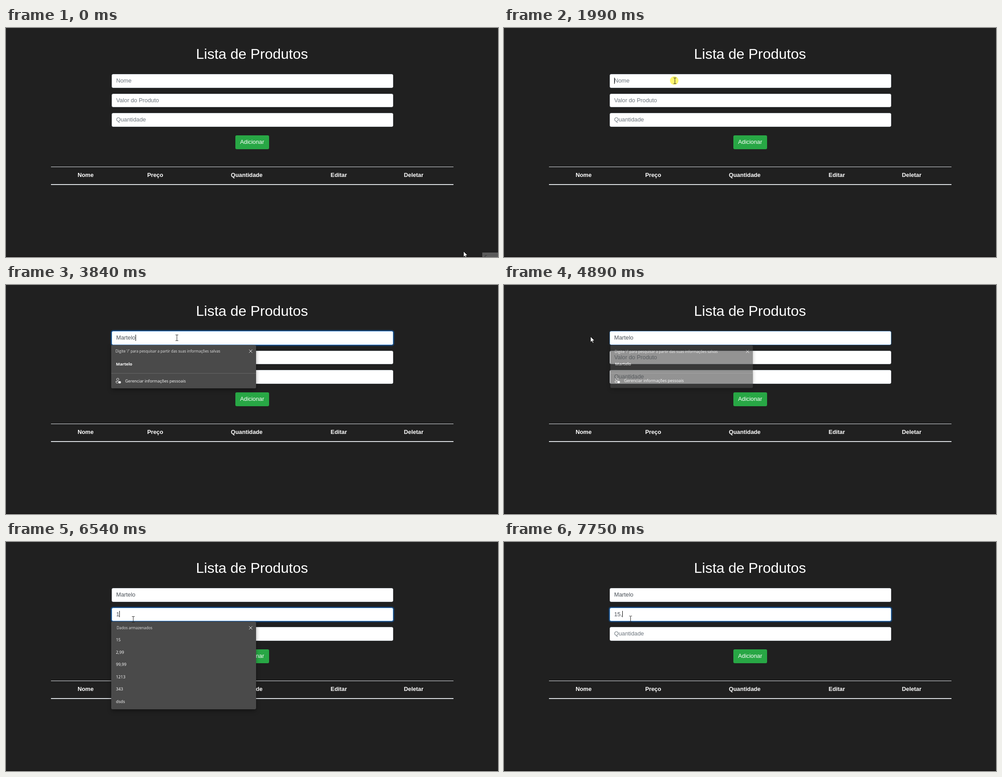
These frames come from a looping animation (1094x512 px, 8 s). An HTML page:

```html
<!DOCTYPE html>
<html lang="pt-BR">
<head>
<meta charset="utf-8">
<title>Lista de Produtos</title>
<style>
html, body { margin: 0; width: 100%; height: 100%; overflow: hidden; background: #202020; }
#stage {
  position: relative; width: 1094px; height: 512px; overflow: hidden; background: #202020;
  font: 12.8px/20px "Liberation Sans", Arial, sans-serif; color: #fff; white-space: pre; cursor: default;
}
#stage div, #stage svg { position: absolute; box-sizing: border-box; }
#stage .title { left: 0; width: 1094px; top: 38px; font-size: 32px; line-height: 40px; text-align: center; }
#stage .field {
  left: 234.6px; width: 626px; height: 30.4px; padding-left: 9.4px; line-height: 28.6px;
  background: #fff; border: 1px solid #ced4da; border-radius: 3.2px; color: #495057;
}
.hint { color: #6c757d; }
.caret { display: inline-block; width: 1px; height: 14px; margin-right: -1px; background: #000; vertical-align: -2.5px; }
#stage .button {
  left: 510px; top: 240px; width: 74.5px; height: 30.6px; line-height: 30.4px;
  border-radius: 3.2px; background: #28a745; text-align: center;
}
#stage .rule { left: 100px; width: 895px; background: #dee2e6; }
#stage .head { top: 319px; width: 120px; margin-left: -60px; font-weight: bold; text-align: center; }
#stage .edge { left: 0; top: 510px; width: 1094px; height: 2px; background: #191717; }
#stage .status {
  left: 1059px; top: 502px; width: 35px; height: 10px; overflow: hidden;
  background: #5a5a5a; color: #222; font: 9px/20px "Open Sans", sans-serif; padding-left: 5px;
}
#stage .popup {
  left: 234px; width: 322px; background: #4a4a4a; border-radius: 3px; overflow: hidden;
  box-shadow: 0 4px 10px rgba(0, 0, 0, .36); font: 9.2px/20px "Open Sans", "Noto Sans", sans-serif;
}
#stage .caption { font-size: 8.3px; color: #e4e4e4; }
#stage .row { left: 10.5px; }
#stage .foot { left: 0; bottom: 0; width: 322px; height: 34px; background: #4a4a4a; border-top: 1px solid #666; padding-left: 31px; line-height: 34px; font-size: 9.05px; }
#stage .track { left: 309px; top: 25px; width: 12px; height: 215px; background: #2c2c2c; }
#stage .thumb { left: 2px; top: 16px; width: 8px; height: 124px; border-radius: 4px; background: #686868; }
svg { overflow: visible; fill: none; stroke: #eee; }
#stage .halo { width: 19px; height: 19px; margin: -10.5px 0 0 -11px; border-radius: 50%; background: rgba(255, 240, 20, .62); }
</style>
</head>
<body>
<div id="stage"></div>
<script>
const LOOP = 8000;
const stage = document.getElementById('stage');

function add(parent, cls, text = '', style = {}) {
  const el = document.createElement('div');
  el.className = cls;
  el.textContent = text;
  Object.assign(el.style, style);
  parent.append(el);
  return el;
}
function addSvg(parent, x, y, markup) {
  parent.insertAdjacentHTML('beforeend',
    `<svg width="1" height="1" style="left:${x}px;top:${y}px">${markup}</svg>`);
  return parent.lastElementChild;
}
const clamp = v => Math.max(0, Math.min(1, v));
const ramp = (t, from, to) => clamp((t - from) / (to - from));
const smooth = k => k * k * (3 - 2 * k);
const within = (t, [from, to]) => t >= from && t < to;
const show = (el, on) => { el.style.display = on ? '' : 'none'; };

// Page
add(stage, 'title', 'Lista de Produtos');

function makeField(top, hint, keys, focus) {
  const el = add(stage, 'field', '', { top: top + 'px' });
  el.innerHTML = '<span></span><span class="caret"></span><span class="hint"></span>';
  const [value, caret, placeholder] = el.children;
  return { el, top, hint, keys, focus, value, caret, placeholder };
}
const fields = [
  makeField(103.4, 'Nome',
    [[2500, 'M'], [2860, 'a'], [3260, 'r'], [3440, 't'], [3600, 'e'], [3650, 'l'], [3840, 'o']],
    { caret: [1960, 4760], ring: [1990, 4760] }),
  makeField(146.8, 'Valor do Produto',
    [[6540, '1'], [6875, '5'], [7750, ',']],
    { caret: [5550, LOOP], ring: [5560, LOOP] }),
  makeField(190.2, 'Quantidade', [], { caret: [LOOP, LOOP], ring: [LOOP, LOOP + 1] })
];
const button = add(stage, 'button', 'Adicionar');

add(stage, 'rule', '', { top: '310px', height: '1px' });
add(stage, 'rule', '', { top: '349px', height: '2px' });
[['Nome', 177], ['Preço', 331.7], ['Quantidade', 535.3], ['Editar', 740], ['Deletar', 906.5]]
  .forEach(([text, x]) => add(stage, 'head', text, { left: x + 'px' }));
add(stage, 'edge');
const status = add(stage, 'status', 'C');

// Suggestion popups
function makePopup(top, caption, captionX, first, gap, items) {
  const el = add(stage, 'popup', '', { top: top + 'px' });
  const rows = items.map(text => add(el, 'row', text));
  add(el, 'caption', caption, { left: captionX + 'px', top: '4px' });
  addSvg(el, 310, 14, '<path d="M-3.5-3.5l7 7m0-7l-7 7"/>');
  return { el, rows, first, gap };
}
function layout(popup, height, keep) {
  let n = 0;
  popup.el.style.height = height + 'px';
  popup.rows.forEach(row => {
    const on = keep(row.textContent);
    show(row, on);
    if (on) row.style.top = popup.first + popup.gap * n++ - 10 + 'px';
  });
}
function fade(popup, t, [inAt, inEnd, outAt, outEnd]) {
  const out = ramp(t, outAt, outEnd);
  show(popup.el, within(t, [inAt, outEnd]));
  popup.el.style.opacity = ramp(t, inAt, inEnd) * (1 - out);
  popup.el.style.transform = `scale(${1 - .04 * out})`;
}
const names = makePopup(134, "Digite '/' para pesquisar a partir das suas informações salvas", 9.5, 43, 30.7,
  ['Martelo', 'Matelo', 'Mabília de Tornade Lusca', 'magic', 'mastering', 'masque', 'mask']);
const track = add(names.el, 'track');
add(track, 'thumb');
addSvg(track, 6, 7, '<path d="M-3 1.5l3-3 3 3"/>');
addSvg(track, 6, 209, '<path d="M-3-1.5l3 3 3-3"/>');
const foot = add(names.el, 'foot', 'Gerenciar informações pessoais');
addSvg(foot, 15, 16,
  '<circle cx="-.5" cy="-3" r="2.6"/><path d="M0 1.5h-4.5q-1 4 4 4"/><rect x="1" y="1.5" width="5" height="4" rx="1" fill="#eee"/>');

const prices = makePopup(178, 'Dados armazenados', 12, 41, 27.5,
  ['15', '2,99', '99,99', '1213', '343', 'dsds']);

// Pointer
const halo = add(stage, 'halo');
const pointers = {
  arrow: '<path fill="#fff" stroke="#000" stroke-width=".8" d="M.4.3V13l3-2.7 2 4.5 2-.9-2-4.4h4z"/>',
  beam: '<path stroke="#222" d="M-3-6.5h2.2L0-5.8l.8-.7H3M0-6V6M-3 6.5h2.2L0 5.8l.8.7H3"/>',
  hand: '<path fill="#fff" stroke="#000" stroke-width=".8" d="M-1 1q1-2 2 0v4l5 1q2 0 2 2-.2 4-2 6H0q-2-3-4-6 0-2 3 0z"/>'
};
for (const kind in pointers) pointers[kind] = addSvg(stage, 0, 0, pointers[kind]);

const moves = [
  [20, 70, 1017, 499, 866, 424],
  [280, 1050, 866, 424, 538, 258],
  [1150, 1840, 538, 258, 380, 118],
  [4490, 4730, 380, 118, 192, 115],
  [4900, 5280, 192, 115, 283, 173],
  [6840, 6880, 283, 173, 281.5, 172]
];
const clicks = [[1960, 2080], [4720, 4830], [5450, 5700]];

function pointerAt(t) {
  const move = moves.filter(m => t >= m[0]).pop() || moves[0];
  const [from, to, x0, y0, x1, y1] = move;
  const k = smooth(ramp(t, from, to));
  return [x0 + (x1 - x0) * k, y0 + (y1 - y0) * k];
}

function drawField(field, t) {
  const { keys, focus } = field;
  const typed = keys.filter(k => t >= k[0]);
  const value = typed.map(k => k[1]).join('');
  const lastKey = typed.length ? typed[typed.length - 1][0] : focus.caret[0];
  field.value.textContent = value;
  field.placeholder.textContent = value ? '' : field.hint;
  show(field.caret, within(t, focus.caret) && (t - lastKey) % 1000 < 500);

  const [on, off] = focus.ring;
  const k = ramp(t, on, on + 150) * (1 - ramp(t, off, off + 150));
  const edge = ramp(t, on, on + 150) * (1 - ramp(t, off + 100, off + 250));
  field.el.style.borderColor = `rgb(${206 - 78 * edge},${212 - 23 * edge},${218 + 37 * edge})`;
  field.el.style.boxShadow = `0 0 0 2.56px rgba(0,123,255,${.3 * k})`;
}

function drawPointer(t) {
  const [x, y] = pointerAt(t);
  const overButton = x > 510 && x < 584 && y > 240 && y < 271;
  const overField = x > 235 && x < 861 && fields.some(f => y > f.top && y < f.top + 30.4);
  const kind = overButton ? 'hand' : overField && !within(t, [6860, 7200]) ? 'beam' : 'arrow';
  for (const name in pointers) {
    show(pointers[name], name === kind);
    pointers[name].style.transform = `translate(${x}px,${y}px)`;
  }
  button.style.background = overButton ? '#218838' : '#28a745';
  show(halo, clicks.some(c => within(t, c)));
  halo.style.transform = `translate(${x}px,${y}px)`;
}

function draw(t) {
  show(status, t < 20);
  fields.forEach(f => drawField(f, t));

  const oneName = t >= 3270;
  layout(names, oneName ? 97 : 275, text => !oneName || text === 'Martelo');
  names.rows.forEach(row => { row.style.fontWeight = t < 2860 ? 400 : 700; });
  show(track, !oneName);
  fade(names, t, [2050, 2110, 4830, 4980]);

  const fewPrices = t >= 6550;
  layout(prices, fewPrices ? 85.5 : 195.5, text => !fewPrices || text.startsWith('1'));
  fade(prices, t, [5530, 5570, 6856, 7006]);

  drawPointer(t);
}

const start = performance.now();
function tick() {
  draw((performance.now() - start) % LOOP);
  requestAnimationFrame(tick);
}
tick();
</script>
</body>
</html>
```
